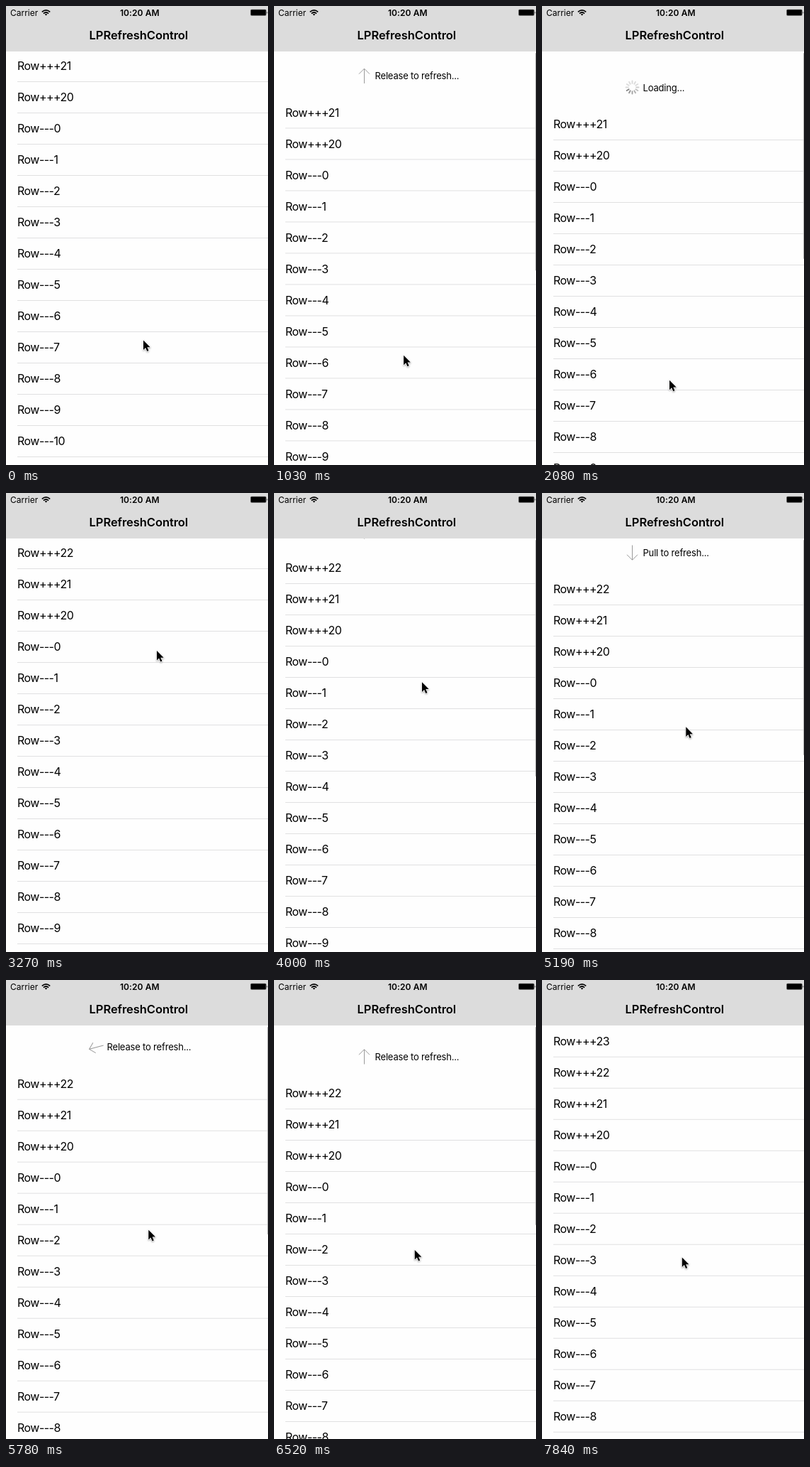
Write an HTML page that moves like this. It is 370 px wide and 646 px high and loops after 7990 ms.

```html
<!DOCTYPE html>
<html lang="en">
<head>
<meta charset="utf-8">
<title>Pull to refresh</title>
<style>
  html, body { margin: 0; width: 100%; height: 100%; overflow: hidden; background: #fefefe; }
  svg { display: block; width: 100%; height: 100%; font-family: Inter, Roboto, sans-serif; fill: #000; }
  .row { font-size: 16px; letter-spacing: -0.52px; }
  .hint { font-size: 13px; letter-spacing: -0.18px; }
  .status { font-size: 12px; }
  .title { font-size: 16.5px; font-weight: 600; letter-spacing: -0.06px; }
</style>
</head>
<body>
<svg viewBox="0 0 370 646">
  <rect width="370" height="646" fill="#fefefe"/>
  <g id="list">
    <g id="rows"></g>
    <path id="arrow" d="M0 -10.5V10M-7.5 2.8L0 10.3L7.5 2.8" fill="none" stroke="#999"/>
    <g id="spinner" transform="translate(127.5 32.5)" stroke="#777" stroke-width="1.9" stroke-linecap="round"></g>
    <text id="hint" class="hint" x="142.5" y="37.5"></text>
  </g>
  <rect id="bar" x="369" y="66" width="2.5" rx="1" fill="#b9b9b9"/>
  <g>
    <rect width="370" height="64" fill="#dcdcdc"/>
    <text class="status" x="6" y="13.6">Carrier</text>
    <path d="M50.8 8.3Q56.5 3.3 62.2 8.3M52.9 10.6Q56.5 7.4 60.1 10.6" fill="none" stroke="#000" stroke-width="1.7"/>
    <path d="M56.5 13.6L54.7 11.8Q56.5 10.4 58.3 11.8Z"/>
    <text class="status" x="188.8" y="13.6" text-anchor="middle" font-weight="600" letter-spacing=".1">10:20 AM</text>
    <rect x="345.2" y="4.7" width="22.4" height="9" rx="1.6" fill="#555"/>
    <rect x="346" y="5.5" width="20.8" height="7.4" rx=".8"/>
    <path d="M368.5 7.5Q370 9.2 368.5 10.9Z"/>
    <text class="title" x="187.3" y="47" text-anchor="middle">LPRefreshControl</text>
  </g>
  <path id="cursor" d="M0 0V13.6L3.1 10.6L5.3 15.6L7.5 14.6L5.3 9.8H9.7Z"
        stroke="#fff" stroke-width="1.3" paint-order="stroke" stroke-linejoin="round"
        style="filter:drop-shadow(0 1px 1px rgba(0,0,0,.35))"/>
</svg>
<script>
const LOOP = 7990, STEP = LOOP / 54;
const ROWS = 15, ROW_H = 44, TOP = 63;
const HEADER = 60, SETTLE = 300;
const DRAG_Y = 1 / 0.475, DRAG_X = -0.19; // pointer travel per pixel of pull

// Each pull: the pointer reaches `grab`, drags through [time, depth], lets go, then loads.
const pulls = [
  { leave: 0, grab: [195.6, 354], drag: [[450, 0], [1184, 82]], release: 2070, done: 2960 },
  { leave: 2220, grab: [213, 222], drag: [[3400, 0], [4587, 42], [5179, 51], [6510, 75], [6660, 80]], release: 6660, done: 7575 }
];
const REST = [194, 470.5];

const $ = id => document.getElementById(id);
const clamp = p => Math.max(0, Math.min(1, p));
const mix = (a, b, p) => a + (b - a) * p;
const ease = p => (1 - Math.cos(Math.PI * clamp(p))) / 2;

function add(parent, tag, attrs) {
  const el = document.createElementNS('http://www.w3.org/2000/svg', tag);
  set(el, attrs);
  return parent.appendChild(el);
}

function set(el, attrs) {
  for (const k in attrs) el.setAttribute(k, attrs[k]);
}

function dragDepth({ drag }, t) {
  let depth = 0;
  for (let i = 1; i < drag.length; i++) {
    const [t0, d0] = drag[i - 1], [t1, d1] = drag[i];
    depth += (d1 - d0) * clamp((t - t0) / (t1 - t0));
  }
  return depth;
}

function offset(pull, t) {
  const held = mix(dragDepth(pull, t), HEADER, ease((t - pull.release) / SETTLE) * (t >= pull.release));
  return held * (1 - ease((t - pull.done) / SETTLE));
}

const dragged = ({ grab: [x, y] }, depth) => [x + depth * DRAG_X, y + depth * DRAG_Y];

function pointer(i, t) {
  const pull = pulls[i], start = pull.drag[0][0];
  if (t >= start) return dragged(pull, dragDepth(pull, t));
  const from = i ? dragged(pulls[i - 1], dragDepth(pulls[i - 1], t)) : REST;
  const p = clamp((t - pull.leave) / (start - 150 - pull.leave));
  return from.map((v, axis) => mix(v, pull.grab[axis], p));
}

const labels = [], spokes = [];
for (let i = 0; i < ROWS; i++) {
  const y = TOP + i * ROW_H;
  labels.push(add($('rows'), 'text', { class: 'row', x: 16, y: y + 27.3 }));
  add($('rows'), 'rect', { x: 16, y: y + 43, width: 354, height: 1, fill: '#e0e0e1' });
}
for (let i = 0; i < 12; i++)
  spokes.push(add($('spinner'), 'path', { d: 'M0 -5.6V-9', transform: `rotate(${i * 30})` }));

function draw(t) {
  const active = t < pulls[1].leave ? 0 : 1;
  const scrolled = t < pulls[1].drag[0][0] ? 0 : 1;
  const pull = pulls[scrolled];
  const off = offset(pull, t);
  const loading = t >= pull.release && t < pull.done;
  const fresh = 2 + pulls.filter(p => t >= p.done).length;

  set($('list'), { transform: `translate(0 ${off.toFixed(2)})` });
  labels.forEach((el, i) => {
    el.textContent = i < fresh ? `Row+++${19 + fresh - i}` : `Row---${i - fresh}`;
  });

  $('hint').textContent = loading ? 'Loading...' : off > HEADER ? 'Release to refresh...' : 'Pull to refresh...';
  set($('arrow'), {
    visibility: loading ? 'hidden' : 'visible',
    transform: `translate(127.5 33) rotate(${180 * clamp((off - HEADER) / 4)})`
  });
  set($('spinner'), { visibility: loading ? 'visible' : 'hidden' });
  const head = 8 + Math.floor(Math.max(0, t - pull.release) * 12 / 1000);
  spokes.forEach((el, i) => {
    set(el, { opacity: Math.max(.25, .9 - (head - i + 12) % 12 * .11) });
  });

  const shown = clamp((t - pull.drag[0][0]) / 150) * clamp((pull.release + 830 - t) / SETTLE);
  set($('bar'), { height: 390 - 18 * fresh + 18 - off, opacity: shown });
  set($('cursor'), { transform: `translate(${pointer(active, t)})` });
}

const start = performance.now();
function tick() {
  const t = (performance.now() - start) % LOOP;
  // The picture refreshes in even steps, with a little slack for rounding.
  draw(Math.floor((t + 8) / STEP) * STEP % LOOP);
  requestAnimationFrame(tick);
}
tick();
</script>
</body>
</html>
```
